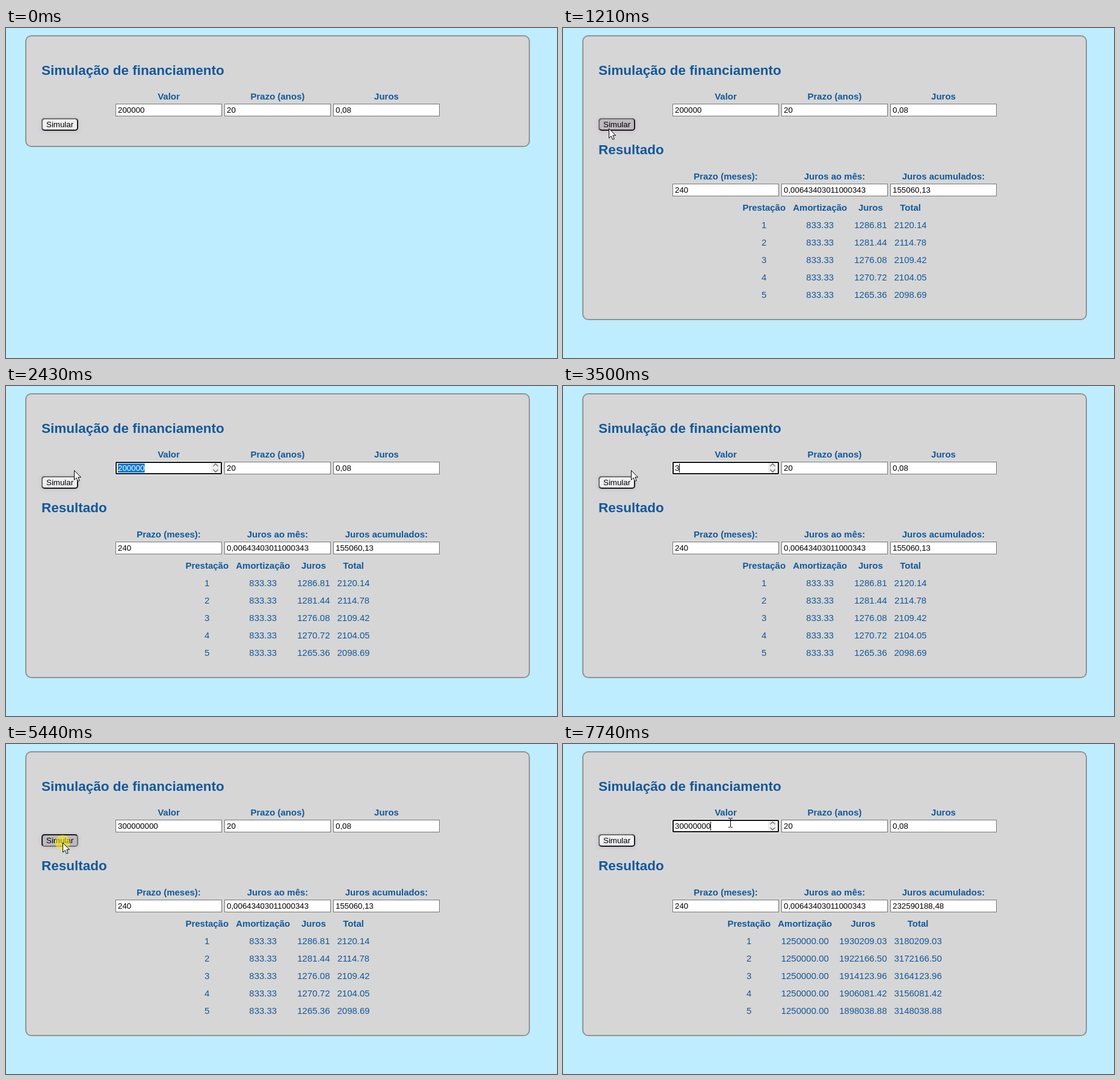
Animation, 916 px wide and 549 px high, one loop 8 s. Source, as an HTML page:

```html
<!DOCTYPE html>
<html lang="pt">
<head>
<meta charset="utf-8">
<title>Simulação de financiamento</title>
<style>
html, body { margin: 0; width: 100%; height: 100%; overflow: hidden; background: #beedff; }
svg { display: block; font-family: "Liberation Sans", Arial, sans-serif; }
text { white-space: pre; }
.h { font: bold 22.5px "Liberation Sans", Arial, sans-serif; fill: #10589c; }
.b { font-weight: bold; }
.c { font-size: 15px; fill: #10589c; text-anchor: middle; }
.v { font-size: 13.333px; fill: #000; }
.box { fill: #fff; stroke: #767676; }
.edge { fill: none; stroke-width: 2; }
#btn { filter: drop-shadow(0 1px 3px rgba(120, 90, 150, .22)); }
</style>
</head>
<body>
<svg width="916" height="549" viewBox="0 0 916 549">
  <rect width="916" height="549" fill="#beedff"/>
  <rect id="panel" x="33" y="13" width="837" rx="9" fill="#d6d6d6" stroke="#929292" stroke-width="2"/>
  <g id="form"></g>
  <rect id="hover" x="182.5" y="126.5" width="176" height="20" fill="none" stroke="#1f9fe0"/>
  <g id="ring" fill="none">
    <rect x="181.5" y="125.5" width="178" height="22" rx="2.5" stroke="#fff"/>
    <rect x="183" y="127" width="175" height="19" rx="1" stroke="#101010" stroke-width="2"/>
  </g>
  <g id="spin" fill="none" stroke="#6c6c6c" stroke-width="1.4">
    <rect x="341" y="128" width="15" height="17" fill="#efefef" stroke="none"/>
    <path d="M344.5 133.5l4-4 4 4M344.5 139l4 4 4-4"/>
  </g>
  <text id="value" class="v" x="186" y="141"></text>
  <rect id="sel" y="129" height="15" fill="#0078d7"/>
  <text id="selText" class="v" y="141" style="fill:#fff"></text>
  <rect id="caret" y="129" width="1" height="15"/>
  <g id="btn">
    <rect id="face" x="60" y="151" width="59" height="19" rx="4"/>
    <rect id="low" class="edge" x="60" y="151" width="59" height="19" rx="4"/>
    <path id="high" class="edge" d="M61.2 168.8A4 4 0 0 1 60 166V155A4 4 0 0 1 64 151H115A4 4 0 0 1 117.8 152.2"/>
  </g>
  <text class="v" x="67" y="165">Simular</text>
  <g id="result"></g>
  <circle id="press" r="12.5" fill="#ffee00" fill-opacity=".55"/>
  <path id="arrow" d="M.5 .5V16.2L4.1 12.8 6.5 18.5 9.2 17.4 6.8 11.8H11.6Z" fill="#fff" stroke="#000"/>
  <path id="beam" d="M-3 -7.5H0M1 -7.5H4M.5 -7V7M-3 7.5H0M1 7.5H4" fill="none" stroke="#000"/>
</svg>
<script>
const LOOP = 8000, STEP = 68, DIGIT = 13.333 * 0.5561;
const $ = id => document.getElementById(id);

const text = (cls, x, y, s) => `<text class="${cls}" x="${x}" y="${y}">${s}</text>`;
const inputs = (y, labels, values) => labels.map((label, i) => {
  const x = 182 + 181 * i;
  return text('c b', x + 88.5, y - 7, label) +
    `<rect class="box" x="${x + .5}" y="${y + .5}" width="176" height="20"/>` +
    text('v', x + 4, y + 15, values[i]);
}).join('');

$('form').innerHTML = text('h', 59, 78, 'Simulação de financiamento') +
  inputs(126, ['Valor', 'Prazo (anos)', 'Juros'], ['', '20', '0,08']);

// Centres of the table columns, which grow with the figures
function columns(figure) {
  const gap = 12, w = (figure.length - .5) * 15 * .5561;
  const widths = [72, 90, w, w];
  let x = 451.5 - (widths.reduce((a, b) => a + b) + 3 * gap) / 2;
  return widths.map(w => (x += w + gap) - gap - w / 2);
}

function results(loan) {
  const months = 240, rate = 1.08 ** (1 / 12) - 1, part = loan / months;
  const sum = (rate * loan * (months + 1) / 2).toFixed(2).replace('.', ',');
  const xs = columns((loan * rate).toFixed(2));
  const row = (cls, y, cells) => cells.map((s, i) => text(cls, xs[i], y, s)).join('');
  let out = text('h', 59, 210, 'Resultado') +
    inputs(259, ['Prazo (meses):', 'Juros ao mês:', 'Juros acumulados:'],
      [months, '0,00643403011000343', sum]) +
    row('c b', 304, ['Prestação', 'Amortização', 'Juros', 'Total']);
  for (let k = 0; k < 5; k++) {
    const due = (loan - part * k) * rate;
    out += row('c', 333 + 29 * k, [k + 1, ...[part, due, part + due].map(n => n.toFixed(2))]);
  }
  return out;
}
const tables = ['', results(200000), results(300000000)];

// Each move curves from the last goal, pulled towards its bend
const moves = [
  { start: 460, end: 1130, bend: [90, 240], goal: [76, 167] },
  { start: 1410, end: 2090, bend: [110, 230], goal: [253, 138] },
  { start: 2160, end: 2430, bend: [183, 138], goal: [113, 140] },
  { start: 4890, end: 5370, bend: [112, 152], goal: [94, 164] },
  { start: 5840, end: 6540, bend: [130, 242], goal: [278, 131] }
];

function pointer(t) {
  const i = moves.filter(m => t >= m.start).length - 1;
  if (i < 0) return null;
  const { start, end, bend, goal } = moves[i];
  const from = i ? moves[i - 1].goal : [168, 440];
  const done = Math.floor((t - start) / STEP + .15) + 1;
  const f = Math.min(1, done * STEP / (end - start + STEP / 2));
  const s = f * f * (3 - 2 * f), r = 1 - s;
  return goal.map((g, j) => Math.round(r * r * from[j] + 2 * r * s * bend[j] + s * s * g));
}

function typed(t) {
  if (t < 3500) return '200000';
  const repeat = Math.floor((t - 4230) / 66 + .1) * 2 + 3;
  const n = t < 3700 ? 1 : t < 4230 ? 2 : t < 7340 ? Math.min(9, repeat) : 8;
  return '3'.padEnd(n, '0');
}

const within = (t, ...spans) => spans.some(([a, b]) => t >= a && t < b);
const show = (id, on) => $(id).setAttribute('visibility', on ? 'visible' : 'hidden');
const set = (id, attrs) => { for (const k in attrs) $(id).setAttribute(k, attrs[k]); };

let stage = -1;
function draw(t) {
  const p = pointer(t), [x, y] = p || [-99, -99];
  const next = t < 1210 ? 0 : t < 5570 ? 1 : 2;
  if (next !== stage) {
    stage = next;
    $('result').innerHTML = tables[stage];
    set('panel', { height: stage ? 472 : 184 });
  }

  const focus = within(t, [2160, 5440], [6680, LOOP]);
  const over = x >= 182 && x < 359 && y >= 126 && y < 147;
  const drag = within(t, [2160, 2430]);
  show('ring', focus);
  show('hover', over && !focus);
  show('spin', over || focus);

  const s = typed(t);
  $('value').textContent = s;
  const picked = within(t, [2220, 3500]);
  const from = Math.max(0, Math.min(s.length, Math.round((x - 186) / DIGIT)));
  const left = 186 + from * DIGIT;
  show('sel', picked);
  show('selText', picked);
  set('sel', { x: left, width: (s.length - from) * DIGIT });
  set('selText', { x: left });
  $('selText').textContent = s.slice(from);
  show('caret', within(t, [2160, 2220], [3500, 4960], [6680, 7210], [7740, LOOP]));
  set('caret', { x: Math.floor(186 + s.length * DIGIT) });

  const onBtn = x >= 59 && x < 120 && y >= 150 && y < 171;
  const down = within(t, [5440, 5570]);
  set('face', { fill: onBtn ? '#bcbabc' : '#efefef' });
  set('low', { stroke: down ? '#707070' : '#1c1a1c' });
  set('high', { stroke: down ? '#1c1a1c' : '#707070' });

  const beam = over || drag;
  for (const id of ['arrow', 'beam', 'press']) set(id, { transform: `translate(${x} ${y})` });
  show('arrow', p && !beam);
  show('beam', p && beam);
  show('press', down || drag || within(t, [1140, 1210], [6680, 6740]));
}

const begin = performance.now();
function tick() {
  draw((performance.now() - begin) % LOOP);
  requestAnimationFrame(tick);
}
tick();
</script>
</body>
</html>
```
